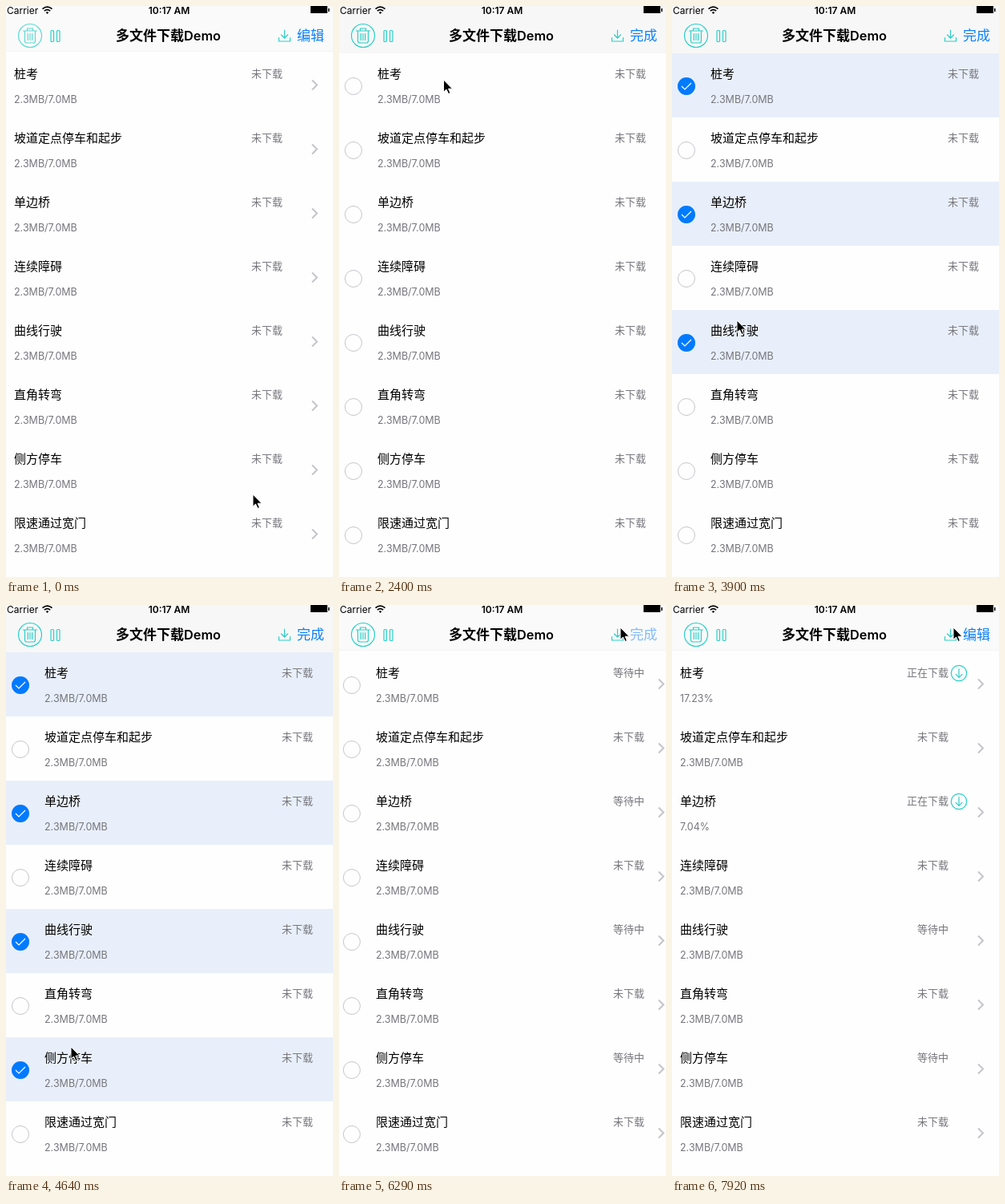
Animation of 408 by 712 pixels, one loop 8000 ms. Source, as an HTML page:

```html
<!DOCTYPE html>
<html lang="zh-CN">
<head>
<meta charset="utf-8">
<title>Downloads</title>
<style>
html, body { margin: 0; width: 100%; height: 100%; overflow: hidden; background: #fefefe; }
svg { display: block; width: 408px; height: 712px; }
text { font-family: Inter, "Noto Sans CJK SC", "Noto Sans CJK", sans-serif; white-space: pre; }
.name { font-size: 15px; fill: #000; }
.size { font-size: 12.5px; fill: #76767c; }
.state { font-size: 13px; fill: #76767c; text-anchor: end; }
.bar { font-size: 12px; }
.line { fill: none; stroke: #2bcfc8; stroke-width: 1.2; stroke-linecap: round; stroke-linejoin: round; }
.chevron { fill: none; stroke: #c4c4c9; stroke-width: 2; }
</style>
</head>
<body>
<svg id="stage" viewBox="0 0 408 712">
  <rect width="408" height="712" fill="#fefefe"/>
  <rect width="408" height="57" fill="#f3f3f3"/>
  <rect id="nav" width="408"/>
  <g id="rows"></g>

  <text class="bar" x="1" y="9.5">Carrier</text>
  <g fill="none" stroke="#000" stroke-width="1.7">
    <path d="M45.5 3.6Q51.5 -1.4 57.5 3.6M47.8 6.2Q51.5 3 55.2 6.2"/>
    <path d="M51.5 10L49.7 7.9Q51.5 6.5 53.3 7.9Z" fill="#000" stroke="none"/>
  </g>
  <text class="bar" x="203.5" y="9.5" text-anchor="middle" font-weight="600">10:17 AM</text>
  <path d="M380 0H401V9H380ZM402 3h1.5v4h-1.5Z"/>

  <g id="trash" class="line">
    <circle cx="30" cy="37" r="14.5"/>
    <path d="M21.5 31H38.5M26.5 31V28H33.5V31M23.5 31V43.5Q23.5 46 26 46H34Q36.5 46 36.5 43.5V31M27.3 34.5V42.5M30 34.5V42.5M32.7 34.5V42.5"/>
  </g>
  <g class="line">
    <rect x="56" y="30.5" width="3.5" height="14" rx="1"/>
    <rect x="63.5" y="30.5" width="3.5" height="14" rx="1"/>
    <path d="M347.5 30V40M343.5 36L347.5 40L351.5 36M340.5 39.5V44H354.5V39.5"/>
  </g>
  <text x="137" y="43.3" font-size="17" font-weight="600">多文件下载<tspan font-size="16.3">Demo</tspan></text>
  <text id="action" x="363" y="43.3" font-size="17" fill="#0a80fa"></text>

  <path id="cursor" d="M0 0V15.2L3.5 12L6 17.5L8.4 16.4L6 11.2H11Z" stroke="#fff"/>
</svg>
<script>
// The screen refreshes once per beat; every time below is in beats.
const LOOP = 8000, BEAT = 149.4, LAST = 53;
const SHIFT = 38, SLIDE = 2, FADE = .67;
const OPEN = 11.31, CLOSE = 41.67, SENT = 42;

const names = ['桩考', '坡道定点停车和起步', '单边桥', '连续障碍', '曲线行驶', '直角转弯', '侧方停车', '限速通过宽门'];
const taps = { 0: 18, 2: 22, 4: 26, 6: 31 };
const loads = { 0: { from: 44, end: 17.23 }, 2: { from: 45, end: 7.04 } };

const moves = [
  { from: 1, to: 7, x: 379, y: 36 },
  { from: 13, to: 17, x: 95, y: 100 },
  { from: 19, to: 21, x: 89, y: 296 },
  { from: 22, to: 24, x: 81, y: 392 },
  { from: 26, to: 29, x: 81, y: 551 },
  { from: 31, to: 37, x: 351, y: 28 }
];

const $ = id => document.getElementById(id);
const clamp = v => Math.max(0, Math.min(1, v));
const ease = p => p < .5 ? 2 * p * p : 1 - 2 * (1 - p) * (1 - p);
const progress = (beat, from, span) => ease(clamp((beat - from) / span));
const move = (el, x, y) => el.setAttribute('transform', `translate(${x} ${y})`);
const show = (el, on) => el.setAttribute('visibility', on ? 'visible' : 'hidden');

const rows = names.map((name, i) => {
  const g = document.createElementNS('http://www.w3.org/2000/svg', 'g');
  move(g, 0, 59 + 80 * i);
  g.innerHTML = `
    <rect width="408" height="80" fill="#e8effa"/>
    <g class="mark">
      <circle cx="18" cy="41" r="10.5" fill="none" stroke="#c7c7cc"/>
      <g class="tick"><circle cx="18" cy="41" r="11" fill="#007aff"/>
      <path d="M12 41L16 45L24 37" fill="none" stroke="#fff" stroke-width="1.2"/></g>
    </g>
    <g class="body">
      <text class="name" x="10" y="30.5">${name}</text>
      <text class="size" x="10" y="62"></text>
      <text class="state" x="345" y="30"></text>
      <g class="line load"><circle cx="358" cy="26" r="9.7"/>
      <path d="M358 20.5V31M354 27.3L358 31.3L362 27.3"/></g>
    </g>
    <path class="chevron" d="M382 33.5L388 39.5L382 45.5"/>`;
  $('rows').append(g);
  const part = s => g.querySelector(s);
  return { back: part('rect'), mark: part('.mark'), tick: part('.tick'), body: part('.body'),
    size: part('.size'), state: part('.state'), load: part('.load'), chevron: part('.chevron') };
});

function drawRow(row, i, beat, shift) {
  const on = beat >= taps[i] && beat < SENT;
  const load = loads[i];
  const running = load && beat >= load.from;
  show(row.back, on);
  show(row.tick, on);
  show(row.mark, shift > 0);
  show(row.load, running);
  show(row.chevron, shift < SHIFT);
  move(row.mark, shift - SHIFT, 0);
  move(row.body, shift, 0);
  move(row.chevron, shift * .47, 0);
  row.state.textContent = running ? '正在下载' : i in taps && beat >= SENT ? '等待中' : '未下载';
  row.size.textContent = running
    ? (load.end * (beat - load.from) / (LAST - load.from)).toFixed(2) + '%'
    : '2.3MB/7.0MB';
}

function drawBar(beat) {
  const editing = beat > OPEN + 1 && beat < SENT;
  $('nav').setAttribute('height', editing ? 59 : 56);
  $('nav').setAttribute('fill', editing ? '#f7f7f7' : '#fafafa');
  $('trash').setAttribute('opacity', beat < OPEN ? .75 : 1);

  // The button fades out, swaps its label and fades back in.
  const [openSwap, closeSwap] = [OPEN + FADE, CLOSE + FADE];
  const gap = Math.min(Math.abs(beat - openSwap), Math.abs(beat - closeSwap));
  const done = beat > openSwap + .1 && beat < closeSwap;
  $('action').textContent = done ? '完成' : '编辑';
  $('action').setAttribute('opacity', clamp(gap / FADE));
}

function drawCursor(beat) {
  let x = 308, y = 609;
  for (const m of moves) {
    const p = progress(beat, m.from, m.to - m.from);
    x += (m.x - x) * p;
    y += (m.y - y) * p;
  }
  move($('cursor'), x, y);
}

function draw(time) {
  const beat = Math.floor(time / BEAT);
  const shift = SHIFT * (progress(beat, OPEN, SLIDE) - progress(beat, CLOSE, SLIDE));
  rows.forEach((row, i) => drawRow(row, i, beat, shift));
  drawBar(beat);
  drawCursor(beat);
}

const start = performance.now();
function frame() {
  draw((performance.now() - start) % LOOP);
  requestAnimationFrame(frame);
}
frame();
</script>
</body>
</html>
```
